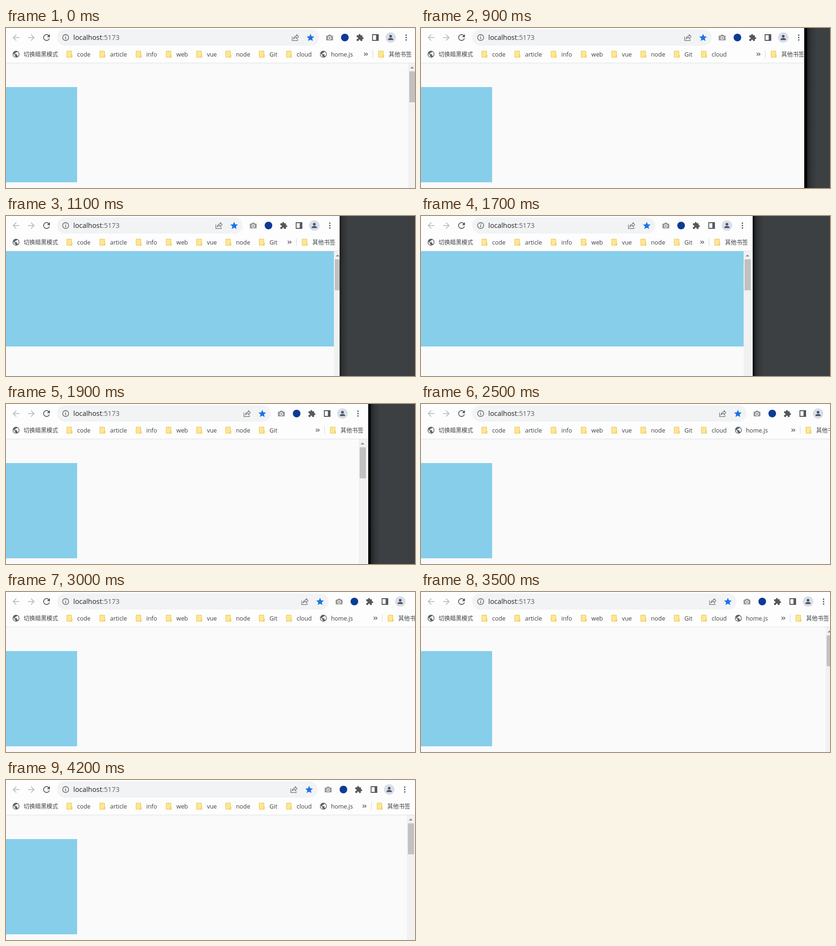
Recreate the animation shown at these times as an HTML page. Size 857 px wide and 336 px high, loop 5.3 s.

```html
<!DOCTYPE html>
<html lang="zh">
<head>
<meta charset="utf-8">
<title>Window resize</title>
<style>
html, body { margin: 0; width: 100%; height: 100%; overflow: hidden; background: #fafafa; }
svg { display: block; width: 857px; height: 336px; }
text { font-family: "Open Sans", "Noto Sans CJK SC", "Noto Sans CJK", sans-serif; fill: #3c4043; font-size: 12.4px; }
.cjk { font-family: "Noto Sans CJK SC", "Noto Sans CJK", sans-serif; font-size: 12px; }
.url { font-size: 14.4px; fill: #202124; }
.port { fill: #5f6368; }
</style>
</head>
<body>
<svg viewBox="0 0 857 336" xmlns="http://www.w3.org/2000/svg">
  <defs>
    <linearGradient id="shade">
      <stop offset="0" stop-opacity=".5"/>
      <stop offset=".35" stop-opacity=".2"/>
      <stop offset="1" stop-opacity="0"/>
    </linearGradient>
    <path id="globe" transform="scale(.72) translate(-12 -12)" fill="#5f6368" d="M12 2a10 10 0 1 0 0 20 10 10 0 0 0 0-20zm-1 17.93c-3.95-.49-7-3.85-7-7.93 0-.62.08-1.21.21-1.79L9 15v1c0 1.1.9 2 2 2v1.93zm6.9-2.54c-.26-.81-1-1.39-1.9-1.39h-1v-3c0-.55-.45-1-1-1H8v-2h2c.55 0 1-.45 1-1V7h2c1.1 0 2-.9 2-2v-.41c2.93 1.19 5 4.06 5 7.41 0 2.08-.8 3.97-2.1 5.39z"/>
    <path id="arrow" transform="scale(.875) translate(-12 -12)" fill="#babcbe" d="M20 11H7.83l5.59-5.59L12 4l-8 8 8 8 1.41-1.41L7.83 13H20z"/>
    <g id="folder">
      <path d="M.5 .5H10.5V8.5H11.5V13.5H.5z" fill="#ffe694" stroke="#e9c64c"/>
      <path d="M9.5 13V9" stroke="#e9c64c"/>
    </g>
  </defs>

  <rect width="857" height="336" fill="#fafafa"/>
  <rect id="box" width="149" height="200" fill="#87ceeb"/>

  <g id="scroll">
    <rect y="74" width="17" height="262" fill="#f1f1f1"/>
    <rect x="2" y="91" width="13" height="65" fill="#c1c1c1"/>
    <path d="M4 85L8 81L12 85z" fill="#8b8b8b"/>
  </g>

  <rect width="857" height="73" fill="#fdfdfd"/>
  <rect y="73" width="857" height="1" fill="#dfe0e2"/>
  <use href="#arrow" x="0" transform="translate(21 20)"/>
  <use href="#arrow" transform="translate(53 20) scale(-1 1)"/>
  <path transform="translate(85 20) scale(.875) translate(-12 -12)" fill="#54585c" d="M17.65 6.35A7.96 7.96 0 0 0 12 4a8 8 0 1 0 7.73 10h-2.08A6 6 0 1 1 12 6c1.66 0 3.14.69 4.22 1.78L13 11h7V4z"/>
  <rect id="omni" x="107" y="3" height="34" rx="17" fill="#f1f3f4"/>
  <circle cx="125" cy="20" r="6.3" fill="none" stroke="#5f6368" stroke-width="1.4"/>
  <path d="M125 19V23.5M125 16.3V17.8" stroke="#5f6368" stroke-width="1.5"/>
  <text class="url" x="141" y="25">localhost<tspan class="port">:5173</tspan></text>

  <use href="#globe" transform="translate(21 55)"/>
  <text class="cjk" x="37" y="60">切换暗黑模式</text>
  <g id="marks"></g>

  <g id="tools">
    <g transform="translate(-32 20)" fill="none" stroke="#6b6f73" stroke-width="1.2" stroke-linejoin="round">
      <path d="M-6.4 -2V6.4H5V3.5"/>
      <path d="M-3.4 3C-3 -1 -.5 -3.2 3 -3.4V-6.3L7 -1.8L3 2.6V-.2C0 -.2 -2 1 -3.4 3z"/>
    </g>
    <path transform="translate(0 20) scale(.8) translate(-12 -11.8)" fill="#1a73e8" d="M12 17.27L18.18 21l-1.64-7.03L22 9.24l-7.19-.61L12 2 9.19 8.63 2 9.24l5.46 4.73L5.82 21z"/>
    <g transform="translate(40 20)">
      <path d="M-6.2 -4H-3.5L-2.2 -6H2.2L3.5 -4H6.2Q7.2 -4 7.2 -3V5Q7.2 6 6.2 6H-6.2Q-7.2 6 -7.2 5V-3Q-7.2 -4 -6.2 -4z" fill="#979797"/>
      <circle cy="1" r="3.4" fill="#fdfdfd"/>
      <circle cy="1" r="2" fill="#979797"/>
    </g>
    <circle cx="72" cy="20" r="8" fill="#0c3a94"/>
    <path transform="translate(104 20) scale(.7) translate(-12.3 -11.7)" fill="#54585c" d="M20.5 11H19V7c0-1.1-.9-2-2-2h-4V3.5a2.5 2.5 0 0 0-5 0V5H4c-1.1 0-1.99.9-1.99 2v3.8H3.5c1.49 0 2.7 1.21 2.7 2.7s-1.21 2.7-2.7 2.7H2V20c0 1.1.9 2 2 2h3.8v-1.5c0-1.49 1.21-2.7 2.7-2.7 1.49 0 2.7 1.21 2.7 2.7V22H17c1.1 0 2-.9 2-2v-4h1.5a2.5 2.5 0 0 0 0-5z"/>
    <path d="M130 14H142V26H130z" fill="none" stroke="#54585c" stroke-width="1.8"/>
    <path d="M137.5 14H142V26H137.5z" fill="#54585c"/>
    <circle cx="168" cy="20" r="11" fill="#dadee6"/>
    <circle cx="168" cy="17.3" r="2.8" fill="#48536b"/>
    <path d="M162.5 25.3V24C162.5 22 166 21 168 21S173.5 22 173.5 24V25.3z" fill="#48536b"/>
    <g fill="#54585c">
      <circle cx="200.5" cy="15" r="1.6"/>
      <circle cx="200.5" cy="20" r="1.6"/>
      <circle cx="200.5" cy="25" r="1.6"/>
    </g>
    <path d="M112.5 52L115.5 55L112.5 58M116.5 52L119.5 55L116.5 58" fill="none" stroke="#54585c" stroke-width="1.4"/>
    <rect x="130" y="47" width="1" height="16" fill="#d3d5d8"/>
    <use href="#folder" x="142" y="48"/>
    <text class="cjk" x="164" y="60">其他书签</text>
  </g>

  <g id="outside">
    <rect width="857" height="336" fill="#3c4043"/>
    <rect id="band" height="336"/>
    <rect id="shadow" width="20" height="336" fill="url(#shade)"/>
  </g>
</svg>
<script>
const LOOP = 5300;
const $ = id => document.getElementById(id);
const set = (el, attrs) => { for (const k in attrs) el.setAttribute(k, attrs[k]); };
const shift = (id, x) => set($(id), { transform: `translate(${x} 0)` });

// label, left edge and right edge of each bookmark
const marks = [
  ["code", 149, 177], ["article", 218, 253], ["info", 294, 316], ["web", 357, 381],
  ["vue", 421, 441], ["node", 482, 511], ["Git", 552, 568], ["cloud", 609, 641], ["home.js", 681, 726]
].map(([label, x, end]) => {
  const g = document.createElementNS("http://www.w3.org/2000/svg", "g");
  const icon = label === "home.js"
    ? `<use href="#globe" transform="translate(${x - 16} 55)"/>`
    : `<use href="#folder" x="${x - 22}" y="48"/>`;
  g.innerHTML = `${icon}<text x="${x}" y="60">${label}</text>`;
  $("marks").append(g);
  return { g, end };
});

// time, star position, then how far edge, black band and scrollbar lag while dragging
const steps = [
  [0, 638],
  [900, 591, { edge: 212, band: 6, bar: 252 }],
  [1000, 531, { edge: 214, band: 5, bar: 252 }],
  [1100, 478, { edge: 221, bar: 209 }],
  [1200, 463],
  [1700, 473, { band: 3, bar: 203 }],
  [1800, 503, { band: 5, bar: 202 }],
  [1900, 537, { band: 5, bar: 202 }],
  [2000, 571, { band: 5, bar: 202 }],
  [2100, 602, { band: 4, bar: 202 }],
  [2200, 625, { band: 2, bar: 203 }],
  [2300, 642], [2400, 655], [2500, 664], [2600, 668],
  [3000, 658], [3100, 654], [3200, 651], [3300, 648], [3400, 645], [3500, 643],
  [3800, 640], [3900, 638], [4100, 636], [4200, 635]
];

function draw(t) {
  const [, star, lag] = steps.findLast(s => s[0] <= t);
  const { edge, band, bar } = { edge: 222, band: 0, bar: 205, ...lag };
  const view = star + bar;
  const narrow = view < 700;

  set($("box"), { y: narrow ? 74 : 124, width: narrow ? view : 149 });
  set($("omni"), { width: star + 18 - 107 });
  set($("band"), { width: band });
  set($("shadow"), { x: band });
  shift("scroll", view);
  shift("tools", star);
  shift("outside", star + edge);
  for (const { g, end } of marks) set(g, { visibility: end + 14 < star + 112 ? "visible" : "hidden" });
}

const start = performance.now();
function tick() {
  draw((performance.now() - start) % LOOP);
  requestAnimationFrame(tick);
}
tick();
</script>
</body>
</html>
```
